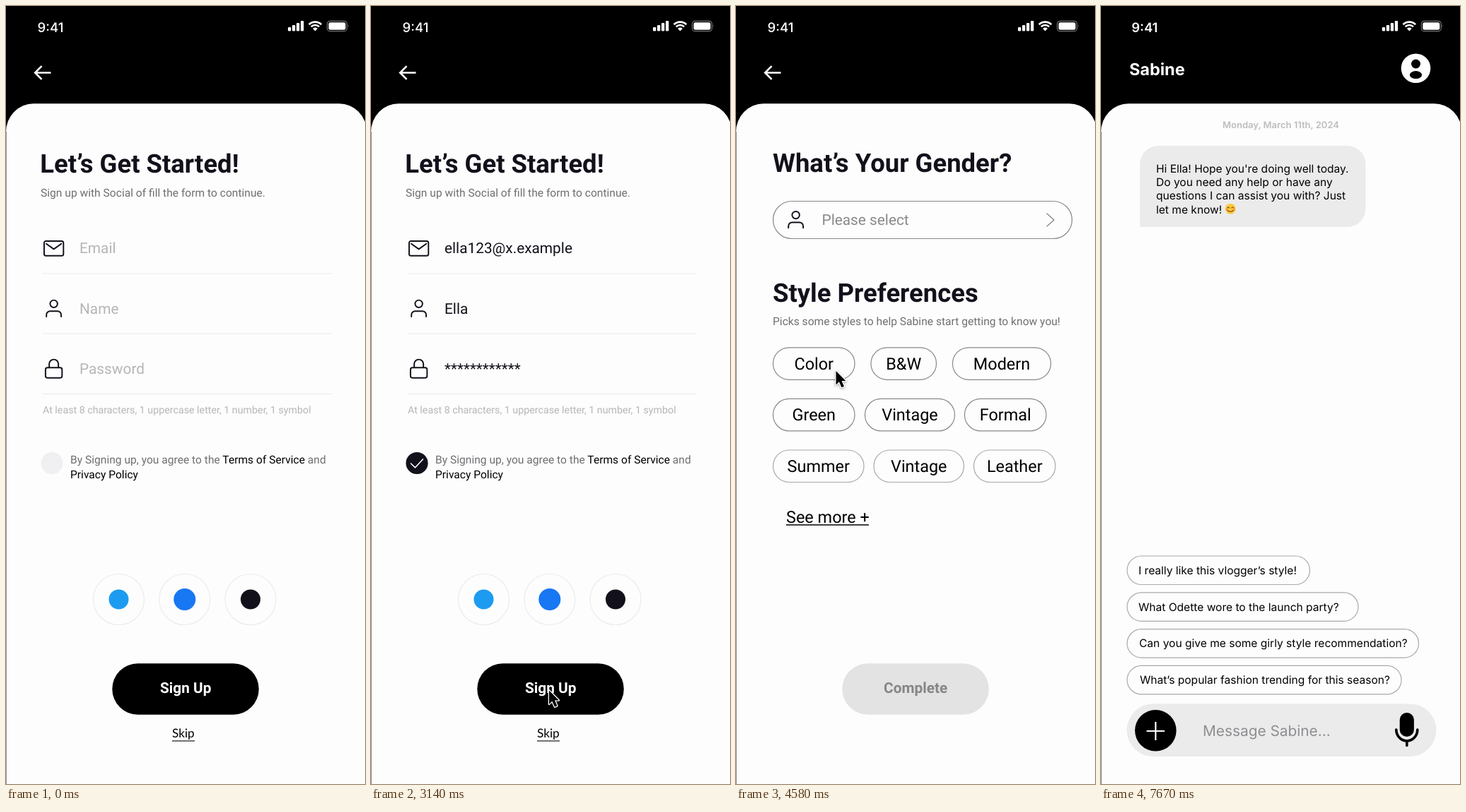
Recreate the animation shown at these times as an HTML page. Size 508 by 1102 pixels, loop 8.47 s.

```html
<!DOCTYPE html>
<html lang="en">
<head>
<meta charset="utf-8">
<title>Sign-up flow</title>
<style>
  html, body { margin: 0; width: 100%; height: 100%; overflow: hidden; background: #000; }
  svg { display: block; width: 100%; height: 100%; }
  text { white-space: pre; text-rendering: geometricPrecision; }
  .roboto { font-family: Roboto, sans-serif; }
  .inter { font-family: Inter, sans-serif; }
  .lato { font-family: Lato, sans-serif; }
</style>
</head>
<body>
<svg id="stage" viewBox="0 0 508 1102"></svg>
<script>
const LOOP = 8470;
const INK = '#12111b', PAPER = '#fdfdfd', PINK = '#f46f8f';
const SMALL = 15.6, CHAT = 15.55, BODY = 20.84, CHIP = 23.45, TITLE = 36.47;

// Drawing helpers
const text = (x, y, size, fill, content, more = '') =>
  `<text x="${x}" y="${y}" font-size="${size}" fill="${fill}" ${more}>${content}</text>`;
const bold = 'font-weight="700"';
const middle = 'text-anchor="middle"';
const circle = (x, y, r, more = '') => `<circle cx="${x}" cy="${y}" r="${r}" ${more}/>`;
const box = (x1, y1, x2, y2, r, more = '') =>
  `<rect x="${x1}" y="${y1}" width="${x2 - x1}" height="${y2 - y1}" rx="${r}" ${more}/>`;
const line = (d, color, width, more = '') =>
  `<path d="${d}" fill="none" stroke="${color}" stroke-width="${width}" ${more}/>`;
const round = 'stroke-linecap="round" stroke-linejoin="round"';
const group = (id, content, more = '') => `<g id="${id}" ${more}>${content}</g>`;

const icons = {
  mail: 'M3.5 4h17a2 2 0 0 1 2 2v12a2 2 0 0 1-2 2h-17a2 2 0 0 1-2-2V6a2 2 0 0 1 2-2zM3.8 7L12 12.8L20.2 7',
  user: 'M20 21v-2a4 4 0 0 0-4-4H8a4 4 0 0 0-4 4v2M16 7a4 4 0 1 1-8 0a4 4 0 1 1 8 0',
  lock: 'M5 11h14a2 2 0 0 1 2 2v7a2 2 0 0 1-2 2H5a2 2 0 0 1-2-2v-7a2 2 0 0 1 2-2zM7 11V7a5 5 0 0 1 10 0v4',
};
const icon = (name, x, y) =>
  `<g transform="translate(${x} ${y}) scale(1.3026)">${line(icons[name], INK, 1.5, round)}</g>`;

const statusIcons = () => {
  const bars = [0, 1, 2, 3].map(i => box(399 + i * 6, 30 - i * 3, 403.3 + i * 6, 35.5, 1.2)).join('');
  const arc = r => {
    const d = r * Math.SQRT1_2;
    return line(`M${437.5 - d} ${35 - d}A${r} ${r} 0 0 1 ${437.5 + d} ${35 - d}`, '#fff', 2.7);
  };
  return `<g fill="#fff">${bars}${arc(12.4)}${arc(8)}<path d="M437.5 35.5l-3.4-3.5a4.8 4.8 0 0 1 6.8 0z"/>
    ${box(456.5, 23.3, 480.5, 33.7, 2.5)}<path d="M484 26.3q1.8 2.2 0 4.4z" opacity=".5"/></g>
    ${box(454.5, 21.3, 482.5, 35.7, 4.2, 'fill="none" stroke="#fff" stroke-opacity=".45" stroke-width="1.2"')}`;
};

const button = (fill, color, label) =>
  box(150.3, 931.2, 357.8, 1003.7, 36.2, `fill="${fill}"`) +
  text(254.2, 973, BODY, color, label, `${bold} ${middle}`);

// Fields: placeholder, entry, icon, icon top, baseline
const fields = [
  ['Email', 'ella123@x.example', 'mail', 327.7, 350],
  ['Name', 'Ella', 'user', 412.7, 435.5],
  ['Password', '************', 'lock', 498, 521],
];
const column = (index, color) =>
  fields.map(f => text(104, f[4], BODY, color, f[index])).join('');

const signUpPage = () =>
  text(48.3, 236, TITLE, INK, 'Let’s Get Started!', bold) +
  text(49, 270, SMALL, '#6f6f73', 'Sign up with Social of fill the form to continue.') +
  fields.map(([, , name, top]) =>
    icon(name, 52, top) + line(`M52 ${top + 51.3}H461`, '#ececec', 1.2)).join('') +
  group('placeholders', column(0, '#b6b6b8')) +
  text(52, 576.5, 14.25, '#b6b6b8', 'At least 8 characters, 1 uppercase letter, 1 number, 1 symbol') +
  circle(65, 647.5, 15.5, 'fill="#f0f0f2"') +
  group('entries', column(1, INK) + circle(65, 647.5, 15.6, `fill="${INK}"`) +
    line('M56.5 648L62.5 653.8L73.5 642', '#fff', 1.6, round)) +
  text(91, 648, SMALL, '#6f6f73',
    'By Signing up, you agree to the <tspan fill="#000">Terms of Service</tspan> and') +
  text(91, 668.5, SMALL, '#000', 'Privacy Policy') +
  [[159.5, '#1d9bf0', 14], [252.8, '#1877f2', 15.5], [346, INK, 14]].map(([x, color, r]) =>
    circle(x, 840.5, 36, 'fill="none" stroke="#ececec" stroke-width="1.2"') +
    circle(x, 840.5, r, `fill="${color}"`)).join('') +
  button('#000', '#fff', 'Sign Up') +
  text(235, 1036, 17.2, '#000', 'Skip', 'class="lato"') + line('M235 1041H267', '#000', 1.1);

// Chips: left, right, label; one list per row
const chipRows = [
  [[52.5, 168, 'Color', 'color'], [191, 283.5, 'B&amp;W'], [306.5, 445.5, 'Modern']],
  [[52.5, 168, 'Green'], [182.5, 309.5, 'Vintage', 'vintage'], [323.5, 439, 'Formal']],
  [[52.5, 181, 'Summer'], [195, 322.5, 'Vintage'], [336.5, 452, 'Leather']],
];
const chip = (left, right, label, top, fill, stroke, color) =>
  box(left, top, right, top + 45.5, 22.7, `fill="${fill}" stroke="${stroke}" stroke-width="1.2"`) +
  text((left + right) / 2, top + 30.7, CHIP, color, label, middle);
const chips = () => chipRows.map((row, i) => row.map(([left, right, label, id]) => {
  const top = 483.8 + i * 72.6;
  return chip(left, right, label, top, 'none', i < 2 ? '#88888b' : '#a9a9ab', '#000') +
    (id ? group(id, chip(left, right, label, top, PINK, '#9a4c60', '#fff')) : '');
}).join('')).join('');

const preferencesPage = () =>
  `<rect x="1" y="190" width="507" height="913" fill="${PAPER}"/>` +
  text(52, 235, TITLE, INK, 'What’s Your Gender?', bold) +
  box(52.5, 276.5, 475.5, 329.5, 26.5, 'fill="none" stroke="#88888b" stroke-width="1.2"') +
  icon('user', 69, 287) +
  line('M440 294L450 303L440 312', '#88888b', 1.4, round) +
  text(52, 419, TITLE, INK, 'Style Preferences', bold) +
  text(52, 452, SMALL, '#6f6f73', 'Picks some styles to help Sabine start getting to know you!') +
  chips() +
  text(71, 732, CHIP, '#000', 'See more +') + line('M71 735H188', '#000', 1.4) +
  group('unselected', text(121.5, 310, BODY, '#8a8a8c', 'Please select') + button('#e3e3e3', '#868686', 'Complete')) +
  group('selected', text(121.5, 310, BODY, '#000', 'Female') + button('#000', '#fff', 'Complete'));

const greeting = ['Hi Ella! Hope you\'re doing well today.', 'Do you need any help or have any',
  'questions I can assist you with? Just', 'let me know!'];
const suggestions = [
  [295.5, 53, 'I really like this vlogger’s style!'],
  [364, 53, 'What Odette wore to the launch party?'],
  [449.5, 54, 'Can you give me some girly style recommendation?'],
  [425, 55, 'What’s popular fashion trending for this season?'],
];
const smiley = (x, y) =>
  circle(x, y, 7.4, 'fill="#fcc93a"') +
  line(`M${x - 4.6} ${y - 1.3}q1.5-2 3 0m3.2 0q1.5-2 3 0M${x - 4} ${y + 2.2}q4 3.6 8 0`, '#7a4318', 1.1, round) +
  circle(x - 5, y + 1.3, 1.5, 'fill="#f58a4b"') + circle(x + 5, y + 1.3, 1.5, 'fill="#f58a4b"');

const chatPage = () =>
  text(40, 98, CHIP, '#fff', 'Sabine', bold) +
  circle(445.5, 88.3, 20.8, 'fill="#fff"') + circle(445.5, 82, 6.5) +
  '<ellipse cx="445.5" cy="97.6" rx="8.6" ry="5.5"/>' +
  text(254.5, 173.3, 13.03, '#bdbdbf', 'Monday, March 11th, 2024', `font-weight="600" ${middle}`) +
  '<path d="M55 313V224a26 26 0 0 1 26-26H348.5a26 26 0 0 1 26 26V287a26 26 0 0 1-26 26z" fill="#ecebec"/>' +
  greeting.map((row, i) => text(78, 235.7 + i * 19.35, CHAT, '#000', row)).join('') +
  smiley(183.2, 287.3) +
  suggestions.map(([right, x, label], i) =>
    box(37, 779 + i * 51.8, right, 819.5 + i * 51.8, 20.2, 'fill="none" stroke="#a9a9ab" stroke-width="1.2"') +
    text(x, 804.7 + i * 51.8, CHAT, '#000', label)).join('') +
  box(36.5, 988.5, 474.5, 1063, 37.2, 'fill="#ecebec"') +
  circle(77.3, 1026.2, 29.3) + line('M64.5 1027H90M77.3 1014V1040', '#fff', 2.2) +
  text(144, 1033.8, BODY, '#8e8e90', 'Message Sabine...') +
  box(422.7, 1001, 442.9, 1035, 10) +
  line('M417.8 1025a15 16 0 0 0 30 0M432.8 1041V1047.5', '#000', 3.6, round);

const clock = (id, x, size, weight) =>
  text(x, 36.7, size, '#fff', '9:41', `id="${id}" class="inter" font-weight="${weight}"`);

document.getElementById('stage').innerHTML =
  '<rect width="508" height="1102"/>' +
  group('status', statusIcons()) +
  clock('clock', 44.6, 18.6, 500) + clock('chatClock', 43.3, 18.4, 600) +
  `<path d="M0 1102V178.2a39 40 0 0 1 39-40H471.5a39 40 0 0 1 39 40V1102z" fill="${PAPER}"/>` +
  line('M.4 178V1102', '#77777a', .9) +
  group('form', line('M63.5 94.5H41.5M50.5 85.2L41.2 94.5L50.5 103.8', '#fff', 2.6) +
    group('signUp', signUpPage()) + group('preferences', preferencesPage()), 'class="roboto"') +
  group('chat', chatPage(), 'class="inter"') +
  group('cursor', `<path d="M0 0V19.4L4.4 15.3L7.9 23.3L11.4 21.8L8 14H13.8z" stroke="#fff"
    stroke-width="2.6" stroke-linejoin="round" paint-order="stroke"/>`,
    'style="filter:drop-shadow(0 1.5px 1.5px rgba(0,0,0,.4))"');

// Cursor: start, end, target x, target y
const entry = [522, 900];
const moves = [
  [250, 940, 71, 657], [1640, 1750, 64.5, 645],
  [2500, 3140, 252, 969.5],
  [3890, 4080, 270, 574], [4190, 4580, 141.5, 517],
  [4910, 5250, 248, 602], [5390, 5560, 244, 577],
  [5890, 6220, 251.5, 936], [6360, 6500, 250.5, 949],
  [7190, 7670, 528, 443],
];
const progress = (t, start, end) => Math.min(1, Math.max(0, (t - start) / (end - start)));
const easeOut = (u, power) => 1 - (1 - u) ** power;

function cursorAt(t) {
  let [x, y] = entry;
  for (const [start, end, toX, toY] of moves) {
    const k = easeOut(progress(t, start, end), 2.6);
    x += (toX - x) * k;
    y += (toY - y) * k;
  }
  return [x, y];
}

const el = id => document.getElementById(id);
const show = (id, visible) => { el(id).style.display = visible ? '' : 'none'; };

function render(t) {
  const chatting = t >= 6720, agreed = t >= 2110, chosen = t >= 4780;
  show('form', !chatting);
  show('clock', !chatting);
  show('chat', chatting);
  show('chatClock', chatting);
  el('status').setAttribute('transform', `translate(${chatting ? -1.2 : 0} 0)`);

  show('placeholders', !agreed);
  show('entries', agreed);
  const dissolve = easeOut(progress(t, 3470, 3780), 2.1);
  show('preferences', dissolve > 0);
  el('preferences').setAttribute('opacity', dissolve);
  el('preferences').setAttribute('transform', `translate(0 ${dissolve < 1 ? -.7 : 0})`);
  show('unselected', !chosen);
  show('selected', chosen);
  show('color', chosen);
  show('vintage', t >= 5720);

  el('cursor').setAttribute('transform', `translate(${cursorAt(t).join(' ')})`);
}

const began = performance.now();
function tick() {
  render((performance.now() - began) % LOOP);
  requestAnimationFrame(tick);
}
tick();
</script>
</body>
</html>
```
